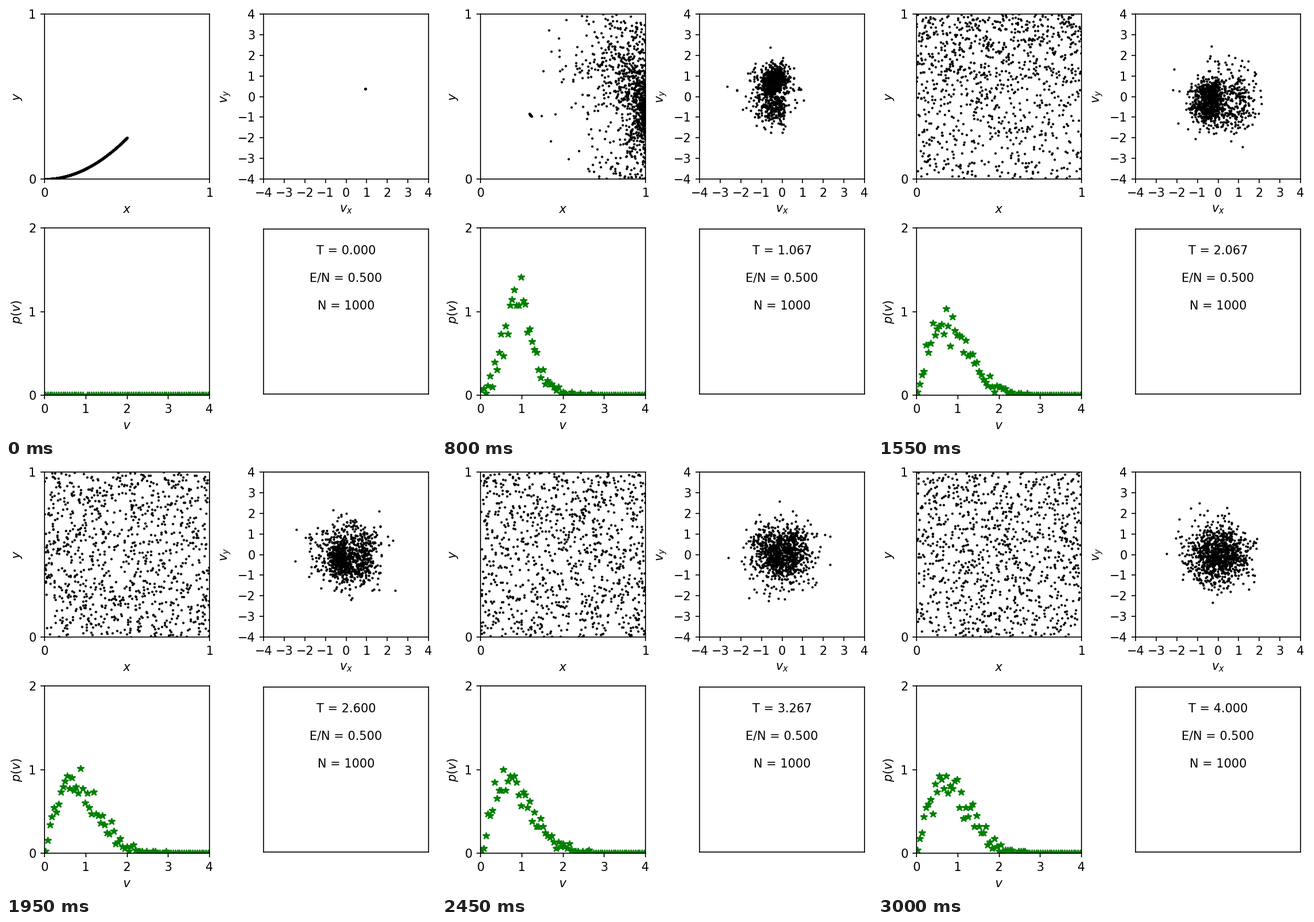
A matplotlib script that plays this animation: 748 px wide and 748 px high, repeating every 3.05 s.

```python
import numpy as np
import matplotlib.pyplot as plt
from matplotlib.animation import FuncAnimation

SIZE, DPI = 748, 150
FRAMES, INTERVAL = 61, 50
DT = 1 / 15            # simulated time per frame
N = 1000
DIAMETER = 1e-3
BINS, V_MAX = 75, 4
X_WALL, Y_WALL = -1, -2


def pair_times(z, w, rows):
    """Time until each particle in rows meets every other one."""
    dz = z - z[rows, None]
    dw = w - w[rows, None]
    a = dw.real**2 + dw.imag**2
    b = dz.real * dw.real + dz.imag * dw.imag
    c = dz.real**2 + dz.imag**2 - DIAMETER**2
    disc = b * b - a * c
    t = np.full(a.shape, np.inf)
    hit = (b < 0) & (disc > 0)
    t[hit] = np.maximum(0, (-b[hit] - np.sqrt(disc[hit])) / a[hit])
    return t


def wall_times(x, v):
    with np.errstate(divide="ignore", invalid="ignore"):
        t = np.where(v > 0, (1 - x) / v, -x / v)
    return np.where(v == 0, np.inf, np.maximum(t, 0))


def schedule(z, w, now, when, mate, rows):
    """Refresh the next event of the particles in rows."""
    t = pair_times(z, w, rows)
    k = np.arange(len(rows))
    best = t.argmin(axis=1)
    options = np.stack([t[k, best],
                        wall_times(z[rows].real, w[rows].real),
                        wall_times(z[rows].imag, w[rows].imag)])
    pick = options.argmin(axis=0)
    when[rows] = now + options[pick, k]
    mate[rows] = np.choose(pick, [best, X_WALL, Y_WALL])

    near = t.argmin(axis=0)
    soonest = now + t.min(axis=0)
    closer = soonest < when
    when[closer] = soonest[closer]
    mate[closer] = rows[near[closer]]


def simulate():
    """Event-driven hard discs in a unit box; positions and velocities are complex."""
    x = np.linspace(0, 0.5, N)
    z = x + 1j * x**2
    w = np.full(N, (5 + 2j) / abs(5 + 2j))
    now = 0.0
    when = np.empty(N)
    mate = np.empty(N, int)
    schedule(z, w, now, when, mate, np.arange(N))

    states = []
    for stop in np.arange(FRAMES) * DT:
        while True:
            i = when.argmin()
            if when[i] > stop:
                break
            z += w * (when[i] - now)
            now = when[i]
            j = mate[i]
            if j == X_WALL:
                w[i] = -w[i].conjugate()
                j = i
            elif j == Y_WALL:
                w[i] = w[i].conjugate()
                j = i
            else:
                n = (z[j] - z[i]) / abs(z[j] - z[i])
                kick = ((w[j] - w[i]) * n.conjugate()).real * n
                w[i] += kick
                w[j] -= kick
            stale = (mate == i) | (mate == j)
            stale[[i, j]] = True
            schedule(z, w, now, when, mate, np.flatnonzero(stale))
        z += w * (stop - now)
        now = stop
        states.append((z.copy(), w.copy()))
    return states


def panel(left, top, width, height, xlim, ylim, xlabel="", ylabel=""):
    ax = fig.add_axes([left / SIZE, 1 - (top + height) / SIZE,
                       width / SIZE, height / SIZE])
    ax.set(xlim=xlim, ylim=ylim, xlabel=xlabel, ylabel=ylabel,
           xticks=range(xlim[0], xlim[1] + 1),
           yticks=range(ylim[0], ylim[1] + 1))
    return ax


fig = plt.figure(figsize=(SIZE / DPI, SIZE / DPI), dpi=DPI, facecolor="white")
space = panel(67, 14, 287, 287, (0, 1), (0, 1), "$x$", "$y$")
velocity = panel(448, 14, 287, 287, (-4, 4), (-4, 4), "$v_x$", "$v_y$")
speed = panel(67, 386, 287, 291, (0, V_MAX), (0, 2), "$v$", "$p(v)$")
info = panel(448, 388, 287, 287, (0, 1), (0, 1))
info.set(xticks=[], yticks=[])

dots, = space.plot([], [], "k.", ms=2)
cloud, = velocity.plot([], [], "k.", ms=2)
stars, = speed.plot([], [], "g*")
label = info.text(0.5, 0.5, "", ha="center", va="bottom", linespacing=1.25)

states = simulate()


def update(frame):
    z, w = states[frame]
    dots.set_data(z.real, z.imag)
    cloud.set_data(w.real, w.imag)
    density, edges = np.histogram(abs(w), BINS, (0, V_MAX), density=True)
    stars.set_data((edges[:-1] + edges[1:]) / 2, density)
    energy = np.mean(abs(w)**2) / 2
    label.set_text(f"T = {frame * DT:.3f}\n\nE/N = {energy:.3f}\n\nN = {N}")
    return dots, cloud, stars, label


anim = FuncAnimation(fig, update, frames=FRAMES, interval=INTERVAL,
                     repeat=True, repeat_delay=0)
plt.show()
```
